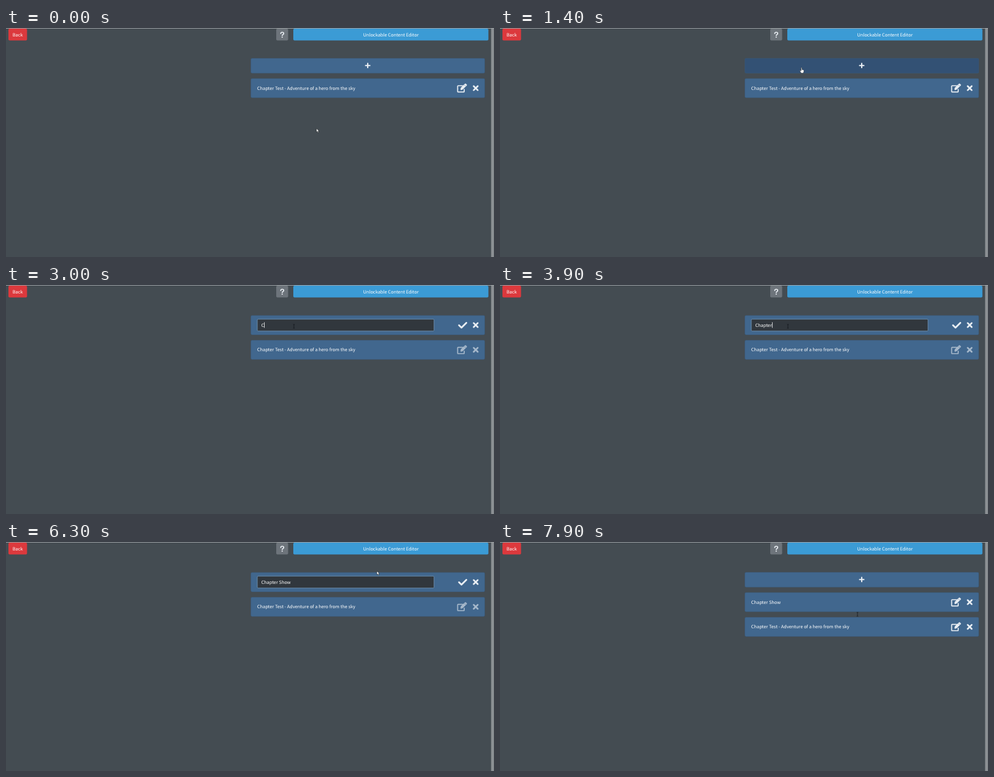
Recreate the animation shown at these times as an HTML page. Size 800 by 377 pixels, loop 8000 ms.

```html
<!DOCTYPE html>
<html lang="en">
<head>
<meta charset="utf-8">
<title>Unlockable Content Editor</title>
<style>
  html, body { margin: 0; width: 100%; height: 100%; overflow: hidden; background: #444c52; }
  svg { display: block; width: 100%; height: 100%; }
  text {
    font: 7.4px "Noto Sans CJK JP", "Noto Sans CJK SC", "Noto Sans CJK KR", "Noto Sans", sans-serif;
    fill: #fff; white-space: pre; text-rendering: geometricPrecision;
  }
  .mid { text-anchor: middle; }
  .panel { fill: #41678e; stroke: #395b7e; stroke-width: .5; }
  .hover { fill: #335174; }
  .icon { fill: none; stroke: #e9eef3; stroke-linecap: round; stroke-linejoin: round; }
  .dim .icon { opacity: .6; }
</style>
</head>
<body>
<svg viewBox="0 0 800 377" preserveAspectRatio="none">
  <defs>
    <linearGradient id="bar">
      <stop offset="0" stop-color="#747a7e"/>
      <stop offset=".5" stop-color="#92969a"/>
      <stop offset="1" stop-color="#7d8286"/>
    </linearGradient>
    <path id="cross" class="icon" d="M766.7 95.8l6.6 6.6m0-6.6l-6.6 6.6" stroke-width="2.7"/>
    <g id="edit">
      <path class="icon" d="M748.5 95H741.2q-.8 0-.8.8V104.6q0 .8.8.8H750.4q.8 0 .8-.8V101.2" stroke-width="1.7"/>
      <path class="icon" d="M745.8 101.2l.4-2.7 5.7-5.7 2.3 2.3-5.7 5.7z" stroke-width="1"/>
      <path d="M745.5 101.5l.4-3.1 5-5 2.7 2.7-5 5zM751.5 92.8l.9-.9q.8-.7 1.6 0l1.2 1.2q.7.8 0 1.6l-.9.9z"
        class="icon" style="fill:#e9eef3" stroke-width=".3"/>
    </g>
    <g id="row">
      <rect class="panel" x="401.5" y="83.3" width="383.3" height="31.5" rx="1.8"/>
      <use href="#edit"/>
      <use href="#cross"/>
    </g>
  </defs>

  <rect width="800" height="377" fill="#444c52"/>
  <rect width="800" height=".9" fill="#a4a9ac"/>
  <rect x="795" y="1" width="5" height="376" fill="url(#bar)"/>

  <rect x="4" y="1" width="30.5" height="19.5" rx="2" fill="#dc393d"/>
  <text class="mid" x="19.2" y="13.7">Back</text>
  <rect x="443" y="1" width="19.5" height="19.5" rx="2" fill="#6d747b"/>
  <path class="icon" d="M450.4 9.1q.2-2.1 2.4-2.1 2.5 0 2.5 2 0 1.2-1.4 1.9-1.1.6-1.1 1.4" stroke-width="1.7"/>
  <circle cx="452.8" cy="15" r="1.1" fill="#e9eef3"/>
  <rect x="471" y="1" width="319.8" height="19.5" rx="2" fill="#3b9bd5"/>
  <text class="mid" x="631" y="13.7">Unlockable Content Editor</text>

  <g id="add">
    <rect id="addPanel" class="panel" x="401.5" y="50" width="383.3" height="24.3" rx="1.8"/>
    <path class="icon" d="M593 58.3v7m-3.5-3.5h7" stroke-width="2.1"/>
  </g>

  <g id="form">
    <rect class="panel" x="401.5" y="50.2" width="383.3" height="31.7" rx="1.8"/>
    <rect x="412" y="56.2" width="289.7" height="19.6" rx="1.6" fill="#31373d" stroke="#7797b4" stroke-width=".8"/>
    <text id="typed" x="418.4" y="68.7"></text>
    <rect id="caret" y="61.3" width=".8" height="9.2" fill="#fff"/>
    <path class="icon" d="M742.6 66.3l4.1 4 8-8" stroke-width="2.8"/>
    <use href="#cross" y="-33.2"/>
  </g>

  <g id="saved">
    <use href="#row"/>
    <text x="411.8" y="101.8">Chapter Show</text>
  </g>
  <g id="first">
    <use href="#row"/>
    <text x="411.8" y="101.8">Chapter Test - Adventure of a hero from the sky</text>
  </g>

  <g id="pointer">
    <path id="arrow" d="M0 0v5.8l1.4-1.2 1 2.2 1.1-.5-1-2.1h1.8z" fill="#fff" stroke="#15181a" stroke-width=".5"/>
    <path id="hand" d="M-.7 .6q.7-1 1.4 0V3.6l2.5.5q.9.3.8 1.2l-.5 2.6-.6 1.3h-3.5L-2.6 6q-.5-1 .5-1.2l1.4.9z"
      fill="#fff" stroke="#15181a" stroke-width=".5"/>
    <path id="beam" d="M-1.3-3.3q1.3 0 1.3.6 0-.6 1.3-.6M0-2.7v5.4M-1.3 3.3q1.3 0 1.3-.6 0 .6 1.3.6"
      fill="none" stroke="#111417" stroke-width=".7"/>
  </g>
</svg>
<script>
  const LOOP = 8000, STEP = 100, OPEN = 1900, SAVE = 7100;
  const $ = id => document.getElementById(id);
  const show = (id, on) => $(id).setAttribute('display', on ? 'inline' : 'none');

  const phrase = 'Chapter Show';
  const keyTimes = [3000, 3100, 3200, 3400, 3500, 3600, 3700, 4900, 5100, 5300, 5500, 5600];

  // time, x, y
  const path = [
    [300, 509, 165.5], [900, 495, 67], [1200, 494.3, 65], [1500, 494.3, 65], [2000, 480, 74],
    [2400, 480, 74], [2700, 472, 68], [5600, 472, 68], [5900, 530, 56], [6300, 608, 48],
    [6700, 747, 65], [7100, 747, 66], [7300, 746, 73], [7600, 690, 172],
    [7800, 612, 138], [7900, 586, 119]
  ];
  // start time, pointer shape
  const shapes = [
    [0, 'arrow'], [900, 'hand'], [OPEN, 'beam'], [5900, 'arrow'], [6600, 'hand'],
    [7400, 'beam'], [7600, 'arrow'], [7800, 'beam']
  ];

  function pointerAt(t) {
    const next = path.findIndex(p => p[0] > t);
    if (next === 0) return path[0].slice(1);
    if (next < 0) return path[path.length - 1].slice(1);
    const [t0, x0, y0] = path[next - 1], [t1, x1, y1] = path[next];
    const u = (t - t0) / (t1 - t0), k = u * u * (3 - 2 * u);
    return [x0 + (x1 - x0) * k, y0 + (y1 - y0) * k];
  }

  function draw(now) {
    const t = Math.floor(now % LOOP / STEP) * STEP;
    const editing = t >= OPEN && t < SAVE, done = t >= SAVE;

    show('add', !editing);
    show('form', editing);
    show('saved', done);
    $('addPanel').classList.toggle('hover', t >= 900 && t < OPEN);
    $('first').setAttribute('transform', `translate(0 ${done ? 40.6 : editing ? 7.6 : 0})`);
    $('first').setAttribute('class', editing ? 'dim' : '');
    document.querySelector('#first use').style.setProperty('--dim', editing ? .6 : 1);

    if (editing) {
      const pressed = keyTimes.filter(k => k <= t);
      const since = t - (pressed.length ? pressed[pressed.length - 1] : OPEN);
      $('typed').textContent = phrase.slice(0, pressed.length);
      const width = pressed.length ? $('typed').getComputedTextLength() : 0;
      $('caret').setAttribute('x', 418.5 + width);
      show('caret', since % 1000 < 500);
    }

    const [x, y] = pointerAt(t);
    const shape = shapes.filter(s => s[0] <= t).pop()[1];
    $('pointer').setAttribute('transform', `translate(${x} ${y})`);
    for (const id of ['arrow', 'hand', 'beam']) show(id, id === shape);
    requestAnimationFrame(draw);
  }

  // Icons inside <use> inherit their opacity from the row.
  const sheet = document.styleSheets[0];
  sheet.insertRule('#edit, #cross { opacity: var(--dim, 1); }', sheet.cssRules.length);
  draw(performance.now());
</script>
</body>
</html>
```
